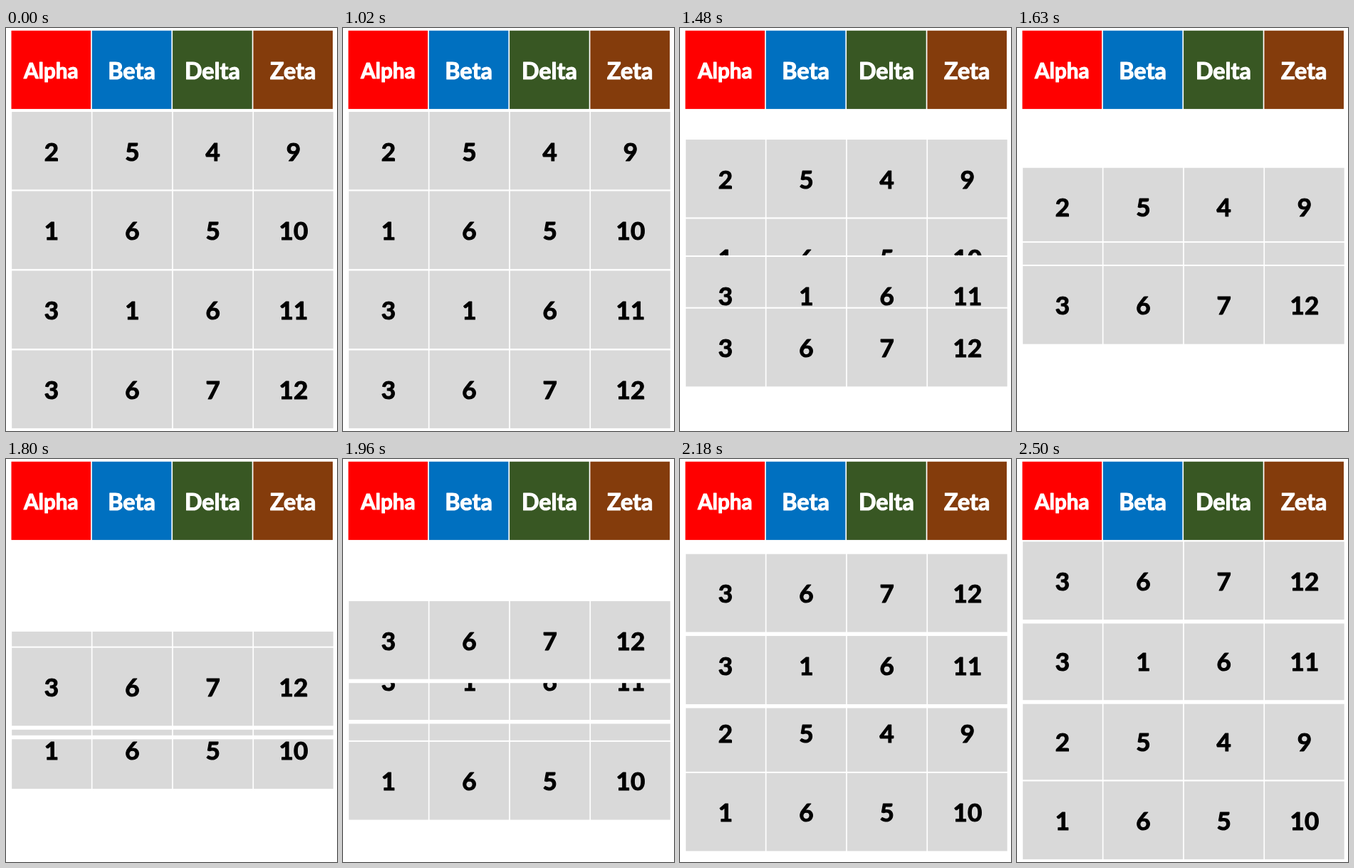
Write an HTML page that moves like this. It is 465 px wide and 567 px high and loops after 3440 ms.

```html
<!DOCTYPE html>
<html lang="en">
<head>
<meta charset="utf-8">
<title>Sorting table rows</title>
<style>
  html, body { margin: 0; width: 100%; height: 100%; overflow: hidden; background: #fff; }
  svg { display: block; width: 465px; height: 567px; }
  text {
    font-family: Lato, Carlito, Calibri, sans-serif; font-weight: 700;
    text-anchor: middle; stroke-width: 1.1px; stroke-linejoin: round;
  }
</style>
</head>
<body>
<svg id="stage" viewBox="0 0 465 567"></svg>
<script>
const LOOP = 3440, START = 1020;
const STEPS = [70, 80, 80, 80, 70, 80, 80, 70, 100, 70, 80, 80, 70, 80, 70, 100, 70, 80, 70];
const PITCH = 113.3, CELL = 111.6, HEIGHT = 109.7;

const HEAD = [
  ['Alpha', '#ff0000', 29.7],
  ['Beta', '#0070c0', 32.3],
  ['Delta', '#385723', 32.3],
  ['Zeta', '#843c0c', 32.3]
];
// Painted bottom to top; pad is the white margin below a row.
const ROWS = [
  { cells: [2, 5, 4, 9], from: 118, to: 342, pad: 0 },
  { cells: [1, 6, 5, 10], from: 229.5, to: 453.5, pad: 0 },
  { cells: [3, 1, 6, 11], from: 341.5, to: 229.5, pad: 5.5 },
  { cells: [3, 6, 7, 12], from: 453.5, to: 116.3, pad: 5.5 }
];

const stage = document.getElementById('stage');

function add(parent, tag, attrs, label) {
  const el = document.createElementNS('http://www.w3.org/2000/svg', tag);
  for (const key in attrs) el.setAttribute(key, attrs[key]);
  if (label !== undefined) el.textContent = label;
  parent.appendChild(el);
  return el;
}

function addCell(parent, x, y, height, fill, label, size, baseline, ink) {
  add(parent, 'rect', { x, y, width: CELL, height, fill });
  add(parent, 'text', {
    x: x + CELL / 2, y: baseline, 'font-size': size, fill: ink, stroke: ink
  }, label);
}

HEAD.forEach(([name, color, size], i) =>
  addCell(stage, 7.5 + i * PITCH, 3.7, 110.2, color, name, size, i ? 72.3 : 71.3, '#fff'));

for (const row of ROWS) {
  row.el = add(stage, 'g', {});
  add(row.el, 'rect', { x: 0, y: -2, width: 465, height: HEIGHT + 2 + row.pad, fill: '#fff' });
  row.cells.forEach((n, i) =>
    addCell(row.el, 8.2 + i * PITCH, 0, HEIGHT, '#d9d9d9', n, 35, 68.5, '#000'));
}

function stepAt(t) {
  let n = 0, end = START;
  if (t < START) return 0;
  while (n < STEPS.length && t >= end + STEPS[n]) end += STEPS[n++];
  return n;
}

function progress(n) {
  const u = Math.min(1, Math.max(0, (n - 0.45) / 18));
  return u * u * u * (10 + u * (6 * u - 15));
}

function draw(t) {
  const p = progress(stepAt(t));
  for (const { el, from, to } of ROWS)
    el.setAttribute('transform', `translate(0 ${(from + (to - from) * p).toFixed(2)})`);
}

const begin = performance.now();
function tick() {
  draw((performance.now() - begin) % LOOP);
  requestAnimationFrame(tick);
}
draw(0);
requestAnimationFrame(tick);
</script>
</body>
</html>
```
